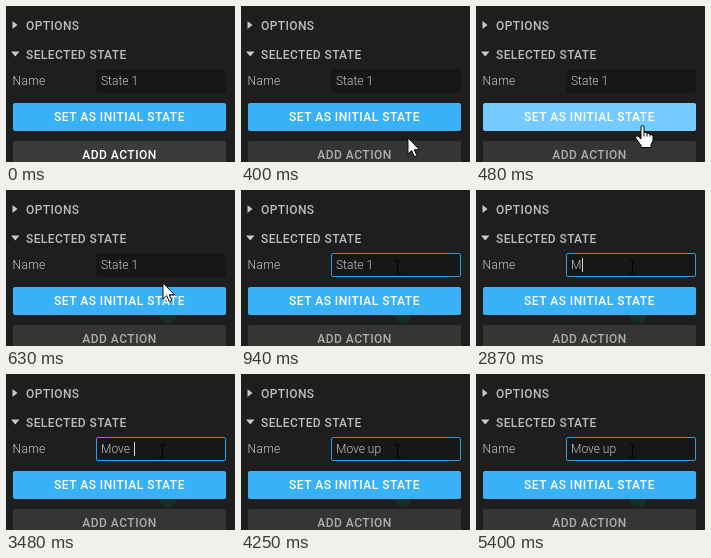
Write an HTML page that moves like this. It is 229x156 px and loops after 5640 ms.

```html
<!DOCTYPE html>
<html lang="en">
<head>
<meta charset="utf-8">
<title>State panel</title>
<style>
  html, body { margin: 0; width: 100%; height: 100%; overflow: hidden; background: #1e1e1e; }
  svg { display: block; width: 100%; height: 100%; }
  text { font: 300 12px Roboto, sans-serif; fill: #c8c8c8; white-space: pre; }
  .title { font-weight: 500; letter-spacing: .4px; fill: #bdbdbd; }
  .button { font-weight: 500; letter-spacing: .5px; text-anchor: middle; fill: #fff; }
  .pointer { fill: #fff; stroke: #000; stroke-linejoin: round; }
</style>
</head>
<body>
<svg viewBox="0 0 229 156">
  <rect width="229" height="156" fill="#1e1e1e"/>
  <path d="M6.5 15 L11.5 19 L6.5 23Z M5 45.5 H13.5 L9.25 50.5Z" fill="#c8c8c8"/>
  <text class="title" x="20" y="24">OPTIONS</text>
  <text class="title" x="20" y="53">SELECTED STATE</text>
  <text x="6.6" y="79" letter-spacing=".3">Name</text>

  <rect id="field" x="90.5" y="63.5" width="129" height="23" rx="1.5" fill="#171717" stroke="#171717"/>
  <rect id="selection" x="95" y="68" width="38" height="14" fill="#1b82c9"/>
  <text id="value" x="95" y="79"></text>
  <rect id="caret" y="68" width="1" height="14" fill="#d8d8d8"/>

  <circle id="glow" cx="162" cy="124" r="9" fill="#192d2b"/>
  <rect id="set" x="7" y="97" width="213" height="28" rx="2"/>
  <text class="button" x="113.5" y="115">SET AS INITIAL STATE</text>
  <rect id="add" x="7" y="135" width="213" height="28" rx="2"/>
  <text id="addLabel" class="button" x="113.5" y="153">ADD ACTION</text>

  <g id="cursor">
    <path id="hand" class="pointer" d="M-1.5 1.5 Q-1.5 0 0 0 Q1.5 0 1.5 1.5 V7 Q4.5 6 4.5 8 Q7.5 7 7.5 9 Q10.5 8.5 10.5 11 V15.5 L8.5 19 V22 H-1.5 V20 L-6.5 13 Q-7.5 11 -6 10.5 Q-4.5 10 -3 12 L-1.5 13.5Z M1.5 7 V11 M4.5 8 V11 M7.5 9 V11"/>
    <path id="arrow" class="pointer" d="M0 0 V16 L3.7 12.6 L6.3 18.6 L8.8 17.5 L6.2 11.7 H11.4Z" stroke-width=".9"/>
    <path id="beam" d="M-3 -6.5 H-1 L0 -5.5 L1 -6.5 H3 M0 -5.5 V5.5 M-3 6.5 H-1 L0 5.5 L1 6.5 H3" fill="none" stroke="#000"/>
  </g>
</svg>
<script>
const LOOP = 5640;
const $ = id => document.getElementById(id);
const show = (id, on) => $(id).setAttribute('visibility', on ? 'visible' : 'hidden');
const attr = (id, name, value) => $(id).setAttribute(name, value);

// time, shape, x, y, main button colour
const pointer = [
  [0, '', 0, 0, '#38b1f7'],
  [320, 'hand', 169, 147, '#38b1f7'],
  [400, 'arrow', 167, 132, '#38b1f7'],
  [480, 'hand', 166.5, 119.5, '#75caff'],
  [550, 'hand', 162, 107, '#75caff'],
  [630, 'arrow', 157, 93, '#38b1f7'],
  [710, 'beam', 156.5, 83, '#38b1f7'],
  [780, 'beam', 156.5, 79, '#38b1f7'],
  [860, 'beam', 156.5, 77, '#38b1f7']
];

// time, field text, caret x (0 = hidden)
const typing = [
  [0, 'State 1', 0],
  [1010, 'State 1', 133],
  [1330, 'State 1', 0],
  [2870, 'M', 106],
  [3100, 'Mo', 113],
  [3190, 'Mov', 119],
  [3330, 'Move', 125],
  [3480, 'Move ', 128],
  [3710, 'Move u', 135],
  [3790, 'Move up', 141],
  [4250, 'Move up', 0],
  [4790, 'Move up', 141],
  [5400, 'Move up', 0]
];

const at = (steps, t) => steps.findLast(step => step[0] <= t);

function draw(t) {
  const [, shape, x, y, blue] = at(pointer, t);
  for (const id of ['hand', 'arrow', 'beam']) show(id, id === shape);
  attr('cursor', 'transform', `translate(${x} ${y})`);
  attr('set', 'fill', blue);

  const bright = t < 400;
  attr('add', 'fill', bright ? '#3b3b3b' : '#353535');
  $('addLabel').style.fill = bright ? '#fff' : '#adadad';
  show('glow', t >= 550);

  const [, text, caret] = at(typing, t);
  $('value').textContent = text;
  const selected = t >= 1330 && t < 2870;
  $('value').style.fill = selected ? '#fff' : '';
  show('selection', selected);
  show('caret', caret > 0);
  attr('caret', 'x', caret);
  attr('field', 'stroke', t < 940 ? '#171717' : '#2d9fe3');
}

const start = performance.now();
function tick() {
  draw((performance.now() - start) % LOOP);
  requestAnimationFrame(tick);
}
tick();
</script>
</body>
</html>
```
